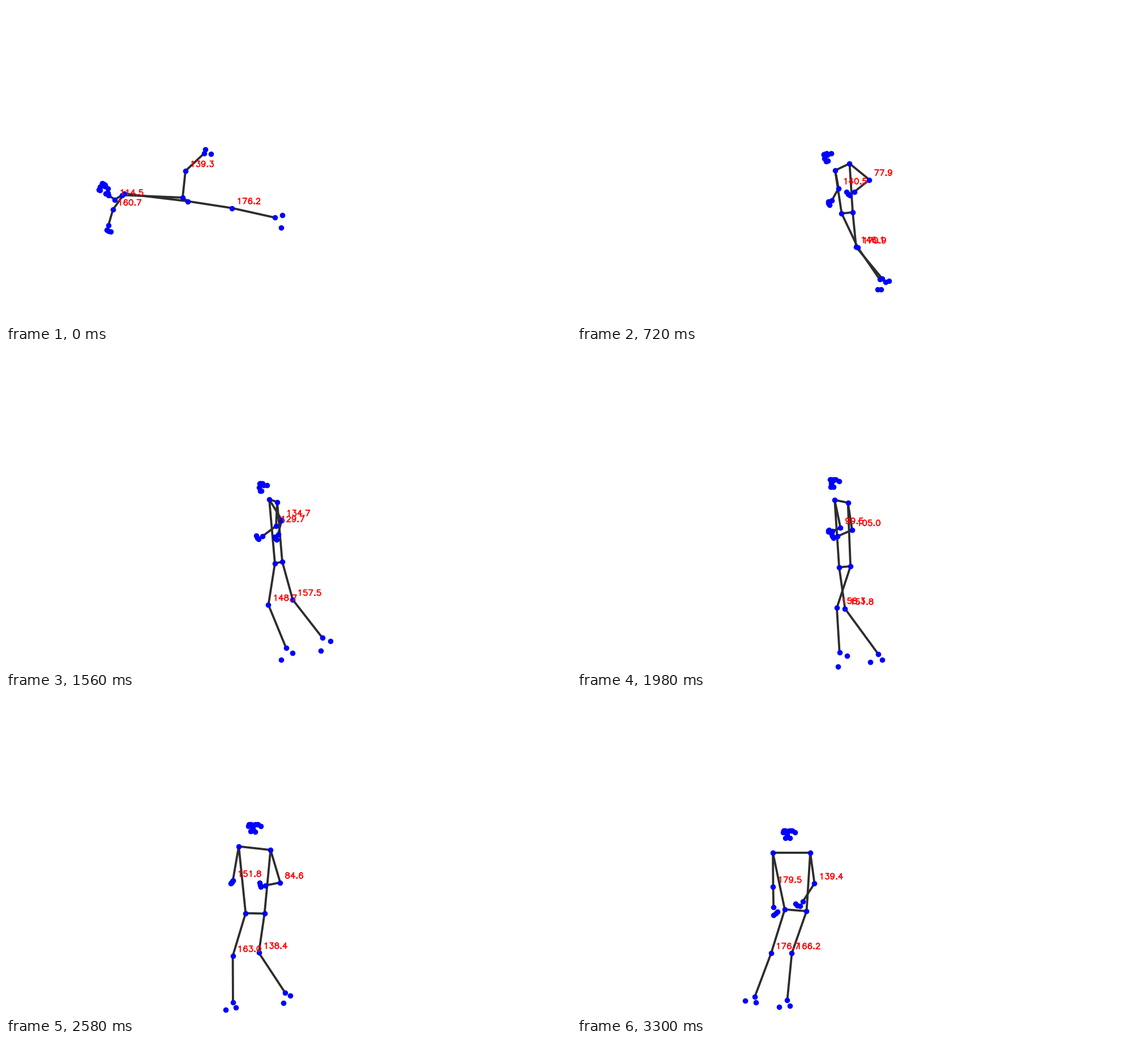
Recreate the animation shown at these times as a matplotlib script. Size 998 px wide and 561 px high, loop 3360 ms.

```python
import numpy as np
import matplotlib.pyplot as plt
from matplotlib.animation import FuncAnimation
from matplotlib.collections import LineCollection

WIDTH, HEIGHT, DPI = 998, 561, 64
FRAMES, INTERVAL = 56, 60
PX = 72 / DPI
SHOULDER, ELBOW, WRIST, HIP, KNEE, ANKLE, HEEL, TOE = 0, 1, 2, 6, 7, 8, 9, 10
HEAD, LEFT, RIGHT = slice(0, 11), slice(11, 22), slice(22, 33)


# Points are complex numbers x + iy, with y pointing down.
def as_xy(z):
    return np.column_stack([np.real(z), np.imag(z)])


def turn(degrees):
    return np.exp(1j * np.radians(degrees))


def limb(root, joint, angle, length):
    """Root, joint and end of a limb, and the unit vector of its lower half."""
    lower = (root - joint) / abs(root - joint) * turn(angle)
    return [root, joint, joint + length * lower], lower


def arm(root, elbow, angle, length, fan):
    """The hand is three fingertips that go on curling the way the elbow bends."""
    joints, lower = limb(root, elbow, angle, length)
    finger = np.arange(3)
    curl = 20 + 20 * fan * (1 - finger)
    reach = length * (0.38 - 0.05 * finger)
    return [*joints, *(joints[-1] + reach * lower * turn(-np.sign(angle) * curl))]


def leg(root, knee, angle, length, profile):
    """Heel and toe look longer the more the body is seen from the side."""
    joints, lower = limb(root, knee, angle, length)
    heel = joints[-1] + length * (0.10 + 0.08 * profile) * lower * turn(-30)
    toe = joints[-1] + length * (0.20 + 0.08 * profile) * lower * turn(45)
    return [*joints, heel, toe]


def head(nose, yaw, roll):
    """Nose, then eye corners, ear and mouth corner on both sides (out, down, back)."""
    half = [(4, -7, 2), (6, -7, 3), (8, -7, 4), (11, -4, 11), (4, 5.5, 2.5)]
    face = [(0, 0, 0)] + [(s * out, down, back) for s in (1, -1) for out, down, back in half]
    out, down, back = np.array(face).T
    across = out * np.cos(np.radians(yaw)) + back * np.sin(np.radians(yaw))
    return nose + (across + 1j * down) * turn(roll)


def pose(face, left_arm, left_leg, right_arm, right_leg):
    profile = np.sin(np.radians(face[1]))
    return np.array([*head(*face),
                     *arm(*left_arm, 1), *leg(*left_leg, profile),
                     *arm(*right_arm, -1), *leg(*right_leg, profile)])


# Head: nose, yaw, roll. Limbs: root, joint, signed bend, length of the lower half.
KEYS = {
    0: pose((166 + 318.5j, 70, 30),
            (209 + 331j, 189 + 359j, 160.7, 29.5), (321.5 + 344.5j, 399.5 + 356.5j, -176.2, 77),
            (205 + 333.5j, 192.5 + 341.5j, -114.5, 14), (312 + 338j, 317 + 291j, -139.3, 45)),
    720: pose((437.5 + 269j, 70, -20),
              (481.5 + 278j, 516.5 + 306.5j, -77.9, 34.5), (487 + 364j, 493 + 425j, 146.1, 72),
              (456 + 290j, 462 + 321.5j, -140.5, 24.5), (467.5 + 366j, 496 + 426j, 170.9, 68)),
    1200: pose((438.5 + 267.5j, 75, -20),
               (477 + 280j, 513.5 + 314.5j, -64.0, 53), (482 + 373j, 477.5 + 447.5j, 123.0, 60),
               (462 + 288j, 466.5 + 325j, -134.2, 20), (478 + 373.5j, 482 + 440.5j, 120.9, 57)),
    1560: pose((447.5 + 239j, 75, 0),
               (479 + 264.5j, 477 + 307j, -129.7, 30), (488 + 370j, 506.5 + 437j, 157.5, 85),
               (465 + 260j, 487 + 296.5j, -134.7, 26), (475 + 373j, 463.5 + 446j, 148.7, 82.5)),
    2340: pose((449 + 230j, 25, 0),
               (477.5 + 267.5j, 493 + 322j, -82.2, 28), (473.5 + 384.5j, 473 + 463j, 140.0, 103),
               (437 + 262j, 431.5 + 322j, -71.7, 19.5), (445.5 + 385j, 415 + 456j, 160.7, 80.5)),
    2880: pose((406 + 230j, 12, 3),
               (444 + 269j, 462 + 328j, -103.3, 28), (429 + 374.5j, 408.5 + 430.5j, 151.8, 59),
               (373 + 261.5j, 364.5 + 323j, 142.9, 30.5), (391.5 + 372j, 381 + 452.5j, 166.4, 85)),
    3300: pose((371 + 241j, 20, 0),
               (412 + 273j, 419.5 + 327j, -139.4, 37.5), (405.5 + 376j, 379.5 + 450j, 166.2, 83.5),
               (346 + 273j, 346.5 + 333j, 179.5, 36), (367 + 373j, 343 + 450j, -176.7, 82)),
}
TIMES = np.array(list(KEYS))
POSES = np.array(list(KEYS.values())).view(float)


def key_slopes():
    """Slopes that never overshoot; the first move starts fast and eases out."""
    step = np.diff(POSES, axis=0) / np.diff(TIMES)[:, None]
    before, after = step[:-1], step[1:]
    total = np.where(before + after == 0, 1, before + after)
    inner = np.where(before * after > 0, 2 * before * after / total, 0)
    return np.vstack([3 * step[:1], inner, step[-1:]])


SLOPES = key_slopes()


def body_at(t):
    k = min(np.searchsorted(TIMES, t, side="right") - 1, len(TIMES) - 2)
    span = TIMES[k + 1] - TIMES[k]
    u = (t - TIMES[k]) / span
    rise = u * u * (3 - 2 * u)
    flat = (POSES[k] * (1 - rise) + POSES[k + 1] * rise
            + span * u * (1 - u) * ((1 - u) * SLOPES[k] - u * SLOPES[k + 1]))
    body = flat.view(complex)

    # During the first stride the legs change places and return.
    swing = 90 * np.sin(np.pi * np.clip((t - 1560) / 780, 0, 1)) ** 2
    for side, direction in ((LEFT, -1), (RIGHT, 1)):
        body[side][KNEE] += 0.4 * swing * direction
        body[side][[ANKLE, HEEL, TOE]] += swing * direction
    return body


def arc(cx, cy, rx, ry, start=0, end=360):
    a = np.radians(np.linspace(start, end, 25))
    return cx + rx * np.cos(a) + 1j * (cy + ry * np.sin(a))


def path(*parts):
    return np.concatenate([np.atleast_1d(part) for part in parts])


# Single-stroke digits on a grid 20 wide and 21 high, y pointing up.
BOWL = arc(10.2, 6.7, 6.8, 6.7, 110, -155)
SIX = [arc(10.5, 6.5, 6.5, 6.5), arc(11, 9, 7, 12, 42, 190)]
GLYPHS = {
    "0": [arc(10, 10.5, 7, 10.5)],
    "1": [path(6 + 17j, 8 + 18j, 11 + 21j, 11)],
    "2": [path(arc(10, 15, 6, 6, 170, -35), 3, 17)],
    "3": [path(5 + 21j, 16 + 21j, 10 + 13j, arc(10.2, 6.5, 6.8, 6.5, 85, -155))],
    "4": [path(13, 13 + 21j, 3 + 7j, 18 + 7j)],
    "5": [path(15 + 21j, 5 + 21j, 4 + 12j, BOWL)],
    "6": SIX,
    "7": [path(3 + 21j, 17 + 21j, 7)],
    "8": [arc(10, 16.5, 6, 4.5), arc(10, 6.2, 7, 6.2)],
    "9": [20 + 21j - stroke for stroke in SIX],
    ".": [arc(5, 1, 1, 1)],
}


def text_strokes(text, origin, scale=0.475):
    strokes = []
    for char in text:
        strokes += [as_xy(origin + scale * np.conj(s)) for s in GLYPHS[char]]
        origin += scale * (10 if char == "." else 20)
    return strokes


def limb_angle(root, joint, end):
    return abs(np.degrees(np.angle((end - joint) / (root - joint))))


fig = plt.figure(figsize=(WIDTH / DPI, HEIGHT / DPI), dpi=DPI, facecolor="white")
ax = fig.add_axes([0, 0, 1, 1])
ax.set(xlim=(0, WIDTH), ylim=(HEIGHT, 0))
ax.axis("off")

bones = LineCollection([], colors="#2d2d2d", linewidths=3.8 * PX, capstyle="round", zorder=1)
labels = LineCollection([], colors="#ff0000", linewidths=1.9 * PX, capstyle="round",
                        joinstyle="round", zorder=3)
ax.add_collection(bones, autolim=False)
ax.add_collection(labels, autolim=False)
dots = ax.scatter([], [], s=(9.6 * PX) ** 2, c="#0000ff", linewidths=0, zorder=2)


def draw(frame):
    body = body_at(frame * INTERVAL)
    left, right = body[LEFT], body[RIGHT]

    lines = [(left[SHOULDER], right[SHOULDER]), (left[HIP], right[HIP])]
    strokes = []
    for side in (left, right):
        lines.append(side[[WRIST, ELBOW, SHOULDER, HIP, KNEE, ANKLE]])
        for joints in ([SHOULDER, ELBOW, WRIST], [HIP, KNEE, ANKLE]):
            value = f"{limb_angle(*side[joints]):.1f}"
            strokes += text_strokes(value, side[joints[1]] + 8 - 7.5j)

    bones.set_segments([as_xy(line) for line in lines])
    labels.set_segments(strokes)
    dots.set_offsets(as_xy(body))
    return bones, dots, labels


anim = FuncAnimation(fig, draw, frames=FRAMES, interval=INTERVAL, repeat=True, repeat_delay=0)
plt.show()
```
